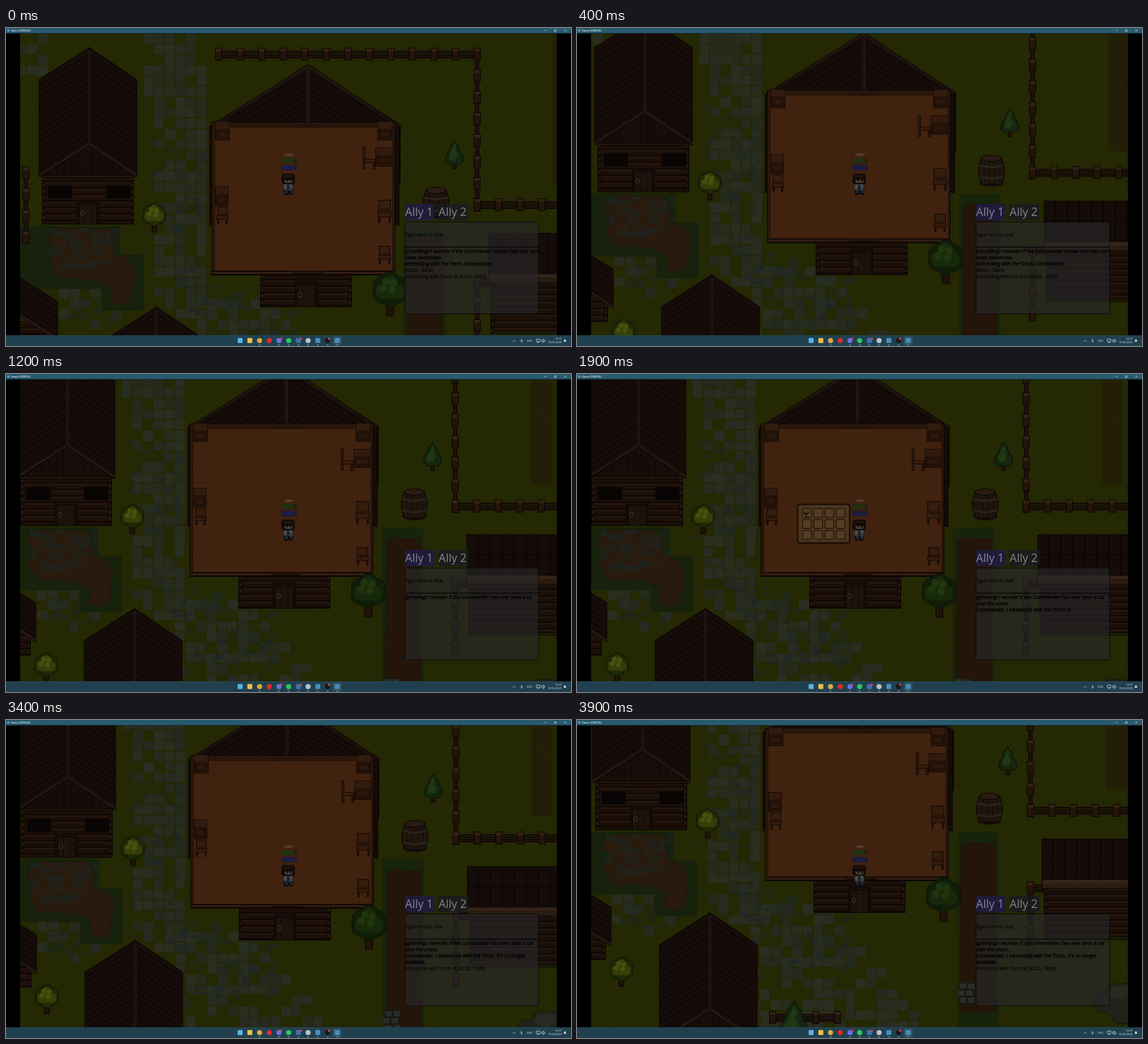
Animation, 800 px wide and 450 px high, one loop 4000 ms. Source, as an HTML page with a canvas:

```html
<!DOCTYPE html>
<html lang="en">
<head>
<meta charset="utf-8">
<title>Game</title>
<style>
html, body { margin: 0; width: 100%; height: 100%; overflow: hidden; background: #000; }
#map { position: absolute; left: 20px; top: 8px; width: 760px; height: 427px; overflow: hidden; }
#world { position: absolute; left: 0; top: 0; will-change: transform; }
#ui { position: absolute; left: 0; top: 0; width: 800px; height: 450px; }
text { font-family: "Open Sans", "Noto Sans", sans-serif; }
.log { font-size: 6.6px; fill: #030303; stroke: #030303; stroke-width: .12px; }
.bold { stroke-width: .4px; letter-spacing: .1px; }
.tiny { font-size: 3.9px; fill: #dfe6ea; }
.tab { font-size: 16px; fill: #85858b; }
</style>
</head>
<body>
<div id="map"><canvas id="world" width="820" height="580"></canvas></div>
<svg id="ui" viewBox="0 0 800 450">
  <rect width="800" height="7.5" fill="#285a6e"/>
  <circle cx="3.3" cy="3.5" r="1.5" fill="#6fa8cc"/>
  <text class="tiny" x="7" y="5" font-weight="600">Game (DEBUG)</text>
  <path d="M762.5 3.5h3M776.5 2.5h2.6v2.4h-2.6zM790.7 2.2l2.6 2.6m0-2.6l-2.6 2.6" fill="none" stroke="#dfe6ea" stroke-width=".6"/>

  <g id="bag">
    <rect x="312.5" y="184.5" width="73.5" height="54.5" rx="3" fill="#4a341d" stroke="#080503" stroke-width="1.4"/>
    <g id="slots" fill="#543d23" stroke="#1a1008" stroke-width="1"></g>
    <path d="M321 195l2 3 4-1 1-2M324.5 198v6" fill="none" stroke="#140c07" stroke-width="1.7"/>
  </g>

  <text x="400.5" y="180.5" text-anchor="middle" font-size="5" fill="#7c7a74">robin</text>
  <rect x="389.5" y="184" width="22.5" height="7.5" rx="1" fill="#2b1e0e"/>
  <rect x="390" y="184.5" width="17" height="6.5" fill="#20310f"/>
  <rect x="389.5" y="193.8" width="22.5" height="7.5" rx="1" fill="#221a24"/>
  <rect x="390" y="194.3" width="19" height="6.5" fill="#1d1c41"/>
  <g id="hero">
    <path d="M393 218h14v11l-1 7h-5l-1-3-1 3h-5l-1-7z" fill="#0d0b0c"/>
    <path d="M392 206h15l2 3v9l-2 4h-14l-3-4v-9z" fill="#120b08"/>
    <path d="M393 208h12l2 3h-15z" fill="#21150e"/>
    <path d="M394 215h12l-1 4h-10z" fill="#4a3c34"/>
    <path d="M397 215h2v2h-2zM402 215h2v2h-2z" fill="#0b0909"/>
    <path d="M393 221h13l1 7-3 2h-9l-2-2z" fill="#34373a"/>
    <path d="M394 222h3v5h-3zM402 222h3v3h-3z" fill="#50524f"/>
    <path d="M398 222h3v8h-3z" fill="#191f2c"/>
    <path d="M395 230h4v4h-4zM402 230h4v4h-4z" fill="#1b2534"/>
  </g>

  <rect x="565" y="249" width="41.5" height="23" rx="3" fill="#201c3e" fill-opacity=".95"/>
  <rect x="612" y="249" width="42.5" height="23" rx="3" fill="#1b1b20" fill-opacity=".88"/>
  <text class="tab" x="565.1" y="266.3">Ally 1</text>
  <text class="tab" x="612.6" y="266.3">Ally 2</text>
  <rect x="565" y="274.5" width="189" height="130" rx="3" fill="#29292a" fill-opacity=".62" stroke="#090909" stroke-width=".8"/>
  <path d="M565 310.2h189" stroke="#060606" stroke-width="1.2"/>
  <text class="log" x="565.2" y="295.2">Type here to chat</text>
  <g id="log"></g>

  <rect y="435" width="800" height="15" fill="#20404f"/>
  <path d="M0 435.3h800" stroke="#2c5061" stroke-width=".6"/>
  <rect x="462.8" y="436.5" width="12.6" height="12" rx="1.5" fill="#2f5160"/>
  <g id="icons"></g>
  <path d="M717.8 443.6l1.8-1.8 1.8 1.8M730 440v3m-1.6-.6q1.6 2.6 3.2 0M730 443.8v1.5M751 440.2h5v3.6h-5zM752 445h3M758.5 441.4h1.3l1.5-1.2v5l-1.5-1.2h-1.3zM762.5 441.2q1.5 1.5 0 3" fill="none" stroke="#dfe6ea" stroke-width=".65"/>
  <text class="tiny" x="737.6" y="444">DEU</text>
  <g text-anchor="end"><text class="tiny" x="787" y="441.4">13:37</text><text class="tiny" x="787" y="446.2">10.02.2025</text></g>
  <path d="M789.6 444q1-1 .6-2.4 1.2-2 2.4 0-.4 1.4.6 2.4z" fill="#dfe6ea"/>
</svg>
<script>
const $ = id => document.getElementById(id);
const ORIGIN = { x: -20, y: -75 };
const g = $('world').getContext('2d');
g.translate(-ORIGIN.x, -ORIGIN.y);

let seed = 11;
const rnd = () => {
  seed = (seed * 1664525 + 1013904223) >>> 0;
  return seed / 4294967296;
};
const DARK = '#090504';
const SOFT = '#180b06';

const rect = (x, y, w, h, fill, edge) => {
  g.fillStyle = fill;
  g.fillRect(x, y, w, h);
  if (edge) { g.strokeStyle = edge; g.lineWidth = 1; g.strokeRect(x + .5, y + .5, w - 1, h - 1); }
};
const poly = (fill, pts, edge) => {
  g.beginPath();
  pts.forEach(([x, y]) => g.lineTo(x, y));
  g.closePath();
  g.fillStyle = fill;
  g.fill();
  if (edge) { g.strokeStyle = edge; g.lineWidth = 1.2; g.stroke(); }
};
const line = (color, width, ...pts) => {
  g.beginPath();
  pts.forEach(([x, y]) => g.lineTo(x, y));
  g.strokeStyle = color;
  g.lineWidth = width;
  g.stroke();
};
const oval = (x, y, rx, ry, fill, edge) => {
  g.beginPath();
  g.ellipse(x, y, rx, ry, 0, 0, 7);
  g.fillStyle = fill;
  g.fill();
  if (edge) { g.strokeStyle = edge; g.lineWidth = 1; g.stroke(); }
};

function ground() {
  rect(-20, -75, 820, 580, '#242803');
  rect(743, -75, 30, 232, '#231f07');
  for (let i = 0; i < 260; i++) {
    const x = rnd() * 820 - 20, y = rnd() * 570 - 70;
    rect(x, y, 2, 1, i % 3 ? '#2d320a' : '#3d3f1a');
    rect(x + 2, y + 1.5, 1, 1, '#33380f');
  }
}

// Chance of a paving stone at a point of the map.
function density(x, y) {
  const middle = y < 40 ? 205 + y * .25 : 215;
  if (y < 350 && Math.abs(x - middle) < 42) return .7;
  if (y > 315 && x > 245 && x < 350 + (y - 325) * .85 && x < 482) return .66;
  if (y > 295 && y < 370 && x > 48 && x < 130) return .55;
  if (x < 30 && y < 0) return .55;
  return 0;
}
function splash(x, y, w, h, count) {
  for (let i = 0; i < count; i++)
    rect(x + rnd() * w, y + rnd() * h, 4 + rnd() * 8, 3 + rnd() * 7, 'rgba(27,40,40,.42)');
}
function paving() {
  for (let y = -70; y < 505; y += 15)
    for (let x = -16; x < 500; x += 15) {
      if (rnd() > density(x + 7, y + 7)) continue;
      const v = 39 + rnd() * 6 | 0;
      g.beginPath();
      g.roundRect(x, y, 13 + rnd() * 2, 13 + rnd() * 2, 2.5);
      g.fillStyle = `rgba(${v},${v + 3},${v - 5},.85)`;
      g.fill();
    }
  splash(165, 90, 80, 250, 60);
  splash(245, 300, 130, 120, 90);
  splash(40, 300, 90, 50, 24);
}

function soil() {
  poly('#17210b', [[-20, 217], [131, 217], [131, 258], [164, 258], [164, 337], [104, 337], [104, 306], [-20, 306]]);
  poly('#281b0d', [[34, 226], [50, 221], [110, 221], [121, 228], [122, 255], [140, 264], [151, 278],
    [147, 320], [134, 330], [120, 324], [117, 302], [94, 293], [45, 291], [31, 270], [38, 249], [29, 240]], '#20180a');
  splash(28, 218, 95, 55, 70);
  rect(532, 217, 59, 280, '#18240a');
  poly('#24150a', [[538, 235], [550, 231], [575, 234], [586, 232], [587, 470], [571, 474], [553, 471], [537, 473]], '#1c1508');
  for (let r = 0; r < 3; r++)
    for (let c = 0; c < 2; c++) rect(535 + c * 12 - r % 2 * 3, 431 + r * 10, 11, 9, '#292d2a', '#181b18');
}

function post(x, y) {
  rect(x - 5, y - 9, 10, 18, '#23140b', DARK);
  rect(x - 4, y - 8, 8, 4, '#352215');
}
function rail(x, y, length, vertical) {
  if (vertical) rect(x - 3, y, 6, length, '#201009', DARK);
  else { rect(x, y - 5, length, 5, '#211209', DARK); rect(x, y + 1, length, 5, '#1c0f08', DARK); }
  for (let d = 0; d <= length; d += 30.5) vertical ? post(x, y + d) : post(x + d, y);
}
function fences() {
  rail(270, -26, 366);
  rail(636, -26, 214, true);
  rail(636, 187, 170);
  rail(-3, 142, 95, true);
  rail(636, 297, 20);
  rail(636, 297, 95, true);
  rail(271, 480, 93);
}

function logs(x, y, w, h) {
  rect(x, y, w, h, '#1b0f08', DARK);
  for (let d = 0; d + 8 < h + 2; d += 9.2) {
    rect(x + 1, y + d + 1, w - 2, 2.4, '#25160e');
    line(DARK, 1.2, [x, y + d + 9], [x + w, y + d + 9]);
    oval(x + 3, y + d + 5, 2.6, 3.2, '#27170e', DARK);
    oval(x + w - 3, y + d + 5, 2.6, 3.2, '#27170e', DARK);
  }
}
function door(x, y, h) {
  rect(x, y, 32, h, '#180d08', DARK);
  rect(x + 3, y + 4, 26, h - 4, '#1d120c', DARK);
  for (const d of [11, 21]) line('#120a07', 1, [x + d, y + 4], [x + d, y + h]);
  oval(x + 8, y + h / 2 + 1, 2.6, 3.6, '#1a110c', '#3d3833');
}
function slope(x, y, side, w, rise, depth) {
  const ex = x + side * w;
  poly('#160c09', [[x, y], [ex, y + rise], [ex, y + rise + depth], [x, y + depth]], DARK);
  for (let d = 8; d < depth; d += 8) line('#0d0706', 1.3, [x, y + d], [ex, y + rise + d]);
  line('#261913', 3, [x, y + depth - 1], [ex, y + rise + depth - 1]);
  line(DARK, 1, [x, y + depth + 1], [ex, y + rise + depth + 1]);
}
function cabin(x, y) {
  logs(x - 67, y + 180, 130, 70);
  poly('#170d08', [[x, y + 137], [x - 67, y + 182], [x + 66, y + 182]], DARK);
  for (let d = -56; d < 60; d += 10) line('#0e0705', 1, [x + d, y + 140 + Math.abs(d) * .66], [x + d, y + 182]);
  rect(x - 67, y + 180, 130, 4, '#25160e', DARK);
  for (const wx of [-59, 23]) rect(x + wx, y + 194, 36, 20, '#080504', '#180e09');
  door(x - 18, y + 216, 34);
  slope(x, y, -1, 71, 45, 137);
  slope(x, y, 1, 67, 45, 137);
  line('#2b1d17', 3.5, [x, y + 3], [x, y + 137]);
  line(DARK, 1, [x, y], [x, y + 137]);
}

function chair(x, y, w, h) {
  rect(x, y, w, h * .55, '#2c170a', SOFT);
  rect(x + 2, y + 2, w - 4, h * .3, '#361d0e');
  rect(x - 1, y + h * .5, w + 2, h * .25, '#331b0d', SOFT);
  rect(x, y + h * .75, 3, h * .25, '#20100a', SOFT);
  rect(x + w - 3, y + h * .75, 3, h * .25, '#20100a', SOFT);
}
function sideChair(x, y) {
  rect(x, y, 4, 32, '#2f180b', SOFT);
  rect(x + 2, y + 17, 16, 6, '#351c0d', SOFT);
  rect(x + 14, y + 22, 4, 10, '#27130a', SOFT);
}
function chest(x, y, w, h) {
  rect(x, y, w, h, '#251309', SOFT);
  rect(x + 1, y + 1, w - 2, h * .35, '#321b0e');
  rect(x + 3, y + h * .5, w - 6, h * .35, '#2b170b', SOFT);
}
function hall() {
  slope(397, -10, -1, 136, 84, 86);
  slope(397, -10, 1, 130, 84, 86);
  line('#2b1d17', 4, [397, -9], [397, 74]);
  line(DARK, 1, [397, -10], [397, 74]);
  line('#261913', 3, [260, 75], [397, -9], [526, 75]);
  line(DARK, 1.2, [258, 76], [397, -11], [528, 76]);
  rect(257, 76, 269, 140, '#160c08', DARK);
  for (let y = 84; y < 214; y += 8) line('#0d0705', 1, [518, y], [526, y + 5]);
  logs(329, 284, 130, 48);
  door(378, 295, 37);
  rect(260, 70, 260, 217, '#29170c', DARK);
  rect(264, 77, 253, 204, '#40220f', '#221208');
  for (let y = 84; y < 280; y += 14) {
    line('#3d200e', .7, [265, y], [516, y]);
    for (let k = 0; k < 5; k++) rect(266 + rnd() * 225, y - 6 + k % 2 * 6, 8 + rnd() * 16, 1, k % 2 ? '#432511' : '#3d200e');
  }
  rect(260, 281, 260, 5, '#321d11', DARK);
  rect(376, 74, 42, 4, '#2b170b', SOFT);
  rect(376, 281, 42, 4, '#28150a', SOFT);
  chest(265, 69, 21, 27);
  chest(495, 69, 21, 27);
  sideChair(474, 105);
  chest(492, 106, 25, 27);
  chest(265, 161, 19, 28);
  chair(268, 190, 15, 24);
  chair(496, 180, 18, 33);
  chair(497, 245, 16, 26);
}

function leftHut() {
  logs(-40, 352, 75, 46);
  poly('#160c09', [[-20, 285], [42, 324], [42, 379], [-20, 340]], DARK);
  for (let d = 8; d < 55; d += 8) line('#0d0706', 1.3, [-20, 285 + d], [42, 324 + d]);
  line('#261913', 3, [-20, 338], [42, 377]);
}
function barn() {
  logs(655, 296, 160, 71);
  rect(652, 227, 160, 58, '#150b08', DARK);
  for (let x = 668; x < 800; x += 17) line('#0c0605', 1.3, [x, 228], [x, 284]);
  line('#0c0605', 1.3, [652, 256], [800, 256]);
  rect(652, 284, 160, 14, '#2b1c12', DARK);
  rect(653, 286, 160, 4, '#352418');
}

function blobTree(x, y, r, shade, mid, light) {
  rect(x - r * .22, y + r * .7, r * .44, r * .95, '#22130a', DARK);
  const puff = (dx, dy, k, c, edge) => oval(x + dx * r, y + dy * r, r * k, r * k, c, edge);
  [[-.42, .3], [.42, .3], [0, .5], [0, -.35], [-.4, -.1], [.4, -.1]].forEach(([a, b]) => puff(a, b, .6, shade, '#0e1404'));
  [[-.4, .2], [.38, .22], [0, -.3], [0, .2]].forEach(([a, b]) => puff(a, b, .46, mid));
  [[-.25, -.4], [.2, -.3], [-.45, 0], [.1, .1]].forEach(([a, b]) => puff(a, b, .22, light));
}
function pine(x, y, s = 1) {
  const at = pts => pts.map(([dx, dy]) => [x + dx * s, y + dy * s]);
  rect(x - 3 * s, y + 30 * s, 6 * s, 10 * s, '#22130a', DARK);
  poly('#14260f', at([[0, 0], [5, 7], [7, 13], [11, 20], [13, 28], [8, 33], [-8, 33], [-13, 28], [-11, 20], [-7, 13], [-5, 7]]), '#0a1406');
  poly('#1f3714', at([[0, 3], [3, 9], [1, 13], [5, 20], [1, 27], [-7, 27], [-8, 20], [-4, 13]]));
}
function barrel(x, y) {
  oval(x, y + 17, 17, 6, '#150d07');
  poly('#20150d', [[x - 14, y - 18], [x + 14, y - 18], [x + 18, y - 4], [x + 18, y + 6], [x + 14, y + 20], [x - 14, y + 20], [x - 18, y + 6], [x - 18, y - 4]], DARK);
  for (const d of [-9, -3, 4, 10]) line('#130b07', 1, [x + d, y - 14], [x + d * 1.2, y + 2], [x + d, y + 20]);
  for (const d of [-7, 9]) line('#29251f', 2.4, [x - 17, y + d], [x, y + d + 3], [x + 17, y + d]);
  oval(x, y - 17, 14, 4.5, '#2a1c14', DARK);
}
function rock() {
  poly('#21231a', [[722, 456], [731, 444], [742, 446], [749, 433], [772, 432], [800, 440], [800, 490], [757, 488], [748, 474], [730, 471]], '#14160f');
  poly('#282a22', [[751, 437], [772, 435], [784, 446], [765, 455], [748, 449]]);
}

ground();
paving();
soil();
fences();
cabin(87, -35);
hall();
blobTree(513, 305, 24, '#101d08', '#17290b', '#21360f');
barn();
leftHut();
rock();
pine(604, 97);
pine(301, 457, 1.9);
barrel(578, 184);
for (const [x, y] of [[179, 200], [57, 410]]) blobTree(x, y, 16, '#202906', '#343e08', '#47500e');
cabin(182, 332);

const NS = 'http://www.w3.org/2000/svg';
const add = (parent, tag, attrs) => {
  const el = document.createElementNS(NS, tag);
  for (const k in attrs) el.setAttribute(k, attrs[k]);
  return parent.appendChild(el);
};
for (let i = 0; i < 12; i++)
  add($('slots'), 'rect', { x: 319.5 + i % 4 * 15.8, y: 190.5 + (i / 4 | 0) * 15.5, width: 12.4, height: 12.4, rx: 2 });

const icons = ['s#58b4e8', 's#efc04c', 'c#dca83d', 'c#e02a2a', 'c#6572e8', 'c#2fc55e', 's#3f6fb0', 'c#b9c2c8', 's#4b8dba', 'c#16181c', 's#4b8dba'];
icons.forEach((icon, i) => {
  const x = 331.5 + i * 13.75, fill = icon.slice(1);
  if (icon[0] === 'c') add($('icons'), 'circle', { cx: x, cy: 442.3, r: 3.6, fill });
  else add($('icons'), 'rect', { x: x - 3.5, y: 438.8, width: 7, height: 7, rx: .8, fill });
  if (i > 1 && i !== 3) add($('icons'), 'rect', { x: x - 1.3, y: 448, width: 2.6, height: .8, fill: '#9db0ba' });
});
for (const x of [389.5, 417.5, 457.5]) add($('icons'), 'circle', { cx: x, cy: 439.8, r: 1.7, fill: '#df3a3a' });

// Each line is [style, text]: i = bold italic, b = bold, n = normal.
const before = [
  ['i', "(chuckling) I wonder if the Commander knows that cats can't"],
  ['i', 'taste sweetness.'],
  ['b', 'Interacting with the Torch, Commander.'],
  ['n', '(8226, -3060)'],
  ['n', 'Interacting with Torch at (8226, -3060)']
];
const after = [
  ['i', '(grinning) I wonder if the Commander has ever seen a cat'],
  ['i', 'play the piano.'],
  ['b', "Commander, I interacted with the Torch. It's no longer"],
  ['b', 'available.'],
  ['n', 'Interacted with Torch at (8226, -3060)']
];
const rows = before.map(() => add($('log'), 'text', {}));
function showLog(lines, count) {
  lines.forEach(([style, text], i) => {
    const skew = style === 'i' ? ' skewX(-12)' : '';
    rows[i].setAttribute('transform', `translate(565.2 ${317.6 + i * 9})${skew}`);
    rows[i].setAttribute('class', style === 'n' ? 'log' : 'log bold');
    rows[i].textContent = text.slice(0, Math.max(0, count));
    count -= text.length;
  });
}

const LOOP = 4000, STEP = 100;
const camera = [[0, 31, 63], [200, 20, 40], [400, 9, 17.5], [500, 4, 9], [600, 1, 3], [800, 0, 0],
  [3225, 0, 0], [3600, 2, -43], [3900, 6, -59], [LOOP, 6, -59]];
function cameraAt(t) {
  const i = camera.findIndex(k => k[0] > t);
  const [a, b] = [camera[i - 1], camera[i]];
  const f = (t - a[0]) / (b[0] - a[0]);
  return [1, 2].map(n => a[n] + (b[n] - a[n]) * f);
}

const start = performance.now();
let shown = -1;
function frame() {
  const t = Math.floor(Math.max(0, performance.now() - start) % LOOP / STEP) * STEP;
  if (t !== shown) {
    shown = t;
    const [x, y] = cameraAt(t);
    $('world').style.transform = `translate(${x + ORIGIN.x - 20}px, ${y + ORIGIN.y - 8}px)`;
    $('bag').style.display = t >= 1400 && t < 2500 ? '' : 'none';
    const walking = t < 600 || t >= 3300;
    $('hero').setAttribute('transform', `translate(0 ${walking && t / STEP % 4 > 1 ? -.5 : 0})`);
    if (t < 540) showLog(before, 999);
    else showLog(after, Math.floor((t - 540) / 12));
  }
  requestAnimationFrame(frame);
}
frame();
</script>
</body>
</html>
```
